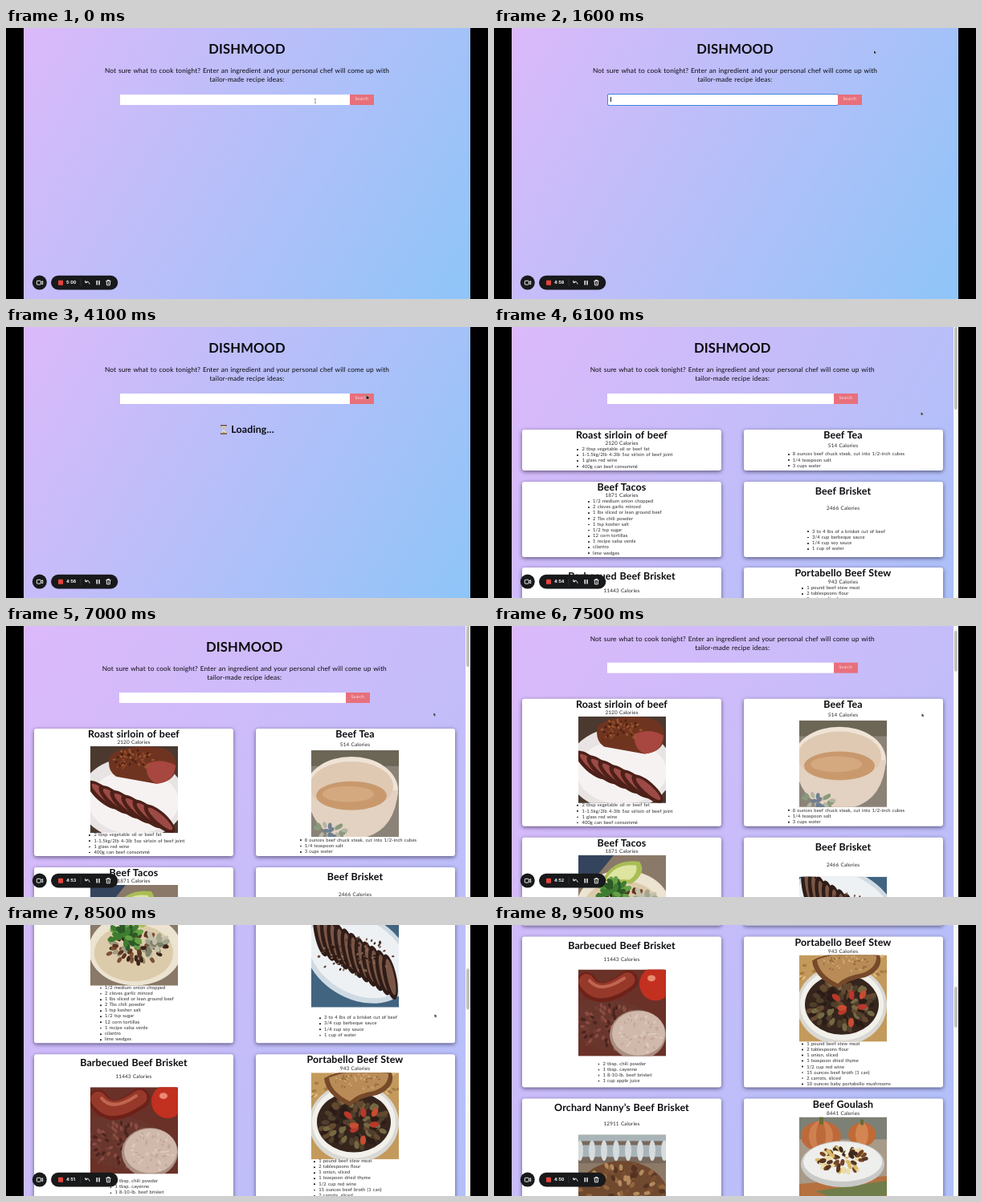
Animation of 600x338 px, one loop 9600 ms. Source, as an HTML page:

```html
<!DOCTYPE html>
<html lang="en">
<head>
<meta charset="utf-8">
<title>Recipe search</title>
<style>
@property --scroll { syntax: '<number>'; inherits: true; initial-value: 0; }

html, body { margin: 0; width: 100%; height: 100%; overflow: hidden; background: #000; }
* { box-sizing: border-box; }
h1, h2, p, ul { margin: 0; padding: 0; }

.stage {
  position: relative; width: 600px; height: 338px; overflow: hidden; background: #000;
  font: 8.3px/1.25 Lato, sans-serif; color: #0b0b10; text-rendering: geometricPrecision;
  letter-spacing: .015em; word-spacing: .06em;
  animation: scroll 9.6s linear infinite;
}
.window { position: absolute; left: 22px; width: 555.5px; height: 338px; overflow: hidden; background: #fafafa; }
.page {
  position: absolute; width: 556px; height: 338px;
  background: linear-gradient(120deg, #dcb9fa, #8ec5f8);
  transform: translateY(calc(var(--scroll) * -1px));
  animation: grow 9.6s step-end infinite;
}
.page > * { position: absolute; }
h1, .intro, .loading { left: 0; width: 100%; text-align: center; }
h1 { top: 15.5px; font-size: 16.6px; }
.intro { top: 48px; line-height: 10.5px; }

.search { left: 0; right: 0; top: 83px; margin: auto; width: 56.7%; height: 13px; display: flex; }
.field { flex: 1; background: #fff; padding: 2.5px 3px; font-size: 6.5px; line-height: 8px; }
.field.focus { outline: 1px solid #3e86dc; border-radius: 1px; }
.caret { display: inline-block; height: 6.5px; width: .6px; background: #222; vertical-align: -1px; }
.button { width: 29.7px; background: #e8707b; color: #fbdcdf; font-size: 5.4px; line-height: 13px; text-align: center; }

.loading { top: 120px; font-size: 12.45px; animation: wait 9.6s step-end infinite; opacity: 0; }
.loading svg { width: 10px; height: 12px; margin-right: 4px; vertical-align: -2px; }

.cards {
  left: 13px; top: 127.5px; width: 523.5px;
  display: grid; grid-template-columns: 1fr 1fr; gap: 13.8px 27.5px;
  opacity: 0; animation: show 9.6s step-end infinite;
}
.card {
  display: grid; align-items: center; justify-items: center;
  background: #fff; border-radius: 3px; box-shadow: 0 1.5px 5px rgba(20, 15, 40, .6);
}
.card h2 { font-size: 12.45px; line-height: 14.6px; }
.card p { font-size: 6.4px; line-height: 8px; color: #26262b; }
.card svg { display: block; width: 109px; height: 0; animation: load 9.6s step-end infinite; }
.card ul {
  position: relative; top: -1px; list-style: none; padding-left: 14px;
  font-size: 5.8px; line-height: 7.15px; color: #26262b;
}
.card li { position: relative; }
.card li::before {
  content: ''; position: absolute; left: -6px; top: 2.8px;
  width: 1.8px; height: 1.8px; border-radius: 50%; background: #111;
}

.thumb {
  position: absolute; left: 551px; top: 0; width: 4px; height: 103px; border-radius: 2px; background: #c1c1c1;
  transform: translateY(calc(var(--scroll) * .153px));
  opacity: 0; animation: show 9.6s step-end infinite, shrink 9.6s step-end infinite;
}
.recorder { position: absolute; left: 30px; top: 306px; width: 112px; height: 24px; }
.time { position: absolute; left: 75px; top: 314px; color: #fff; font: 700 5.4px/8px Inter, sans-serif; letter-spacing: 0; }
.cursor { position: absolute; left: 0; top: 0; width: 6px; height: 8px; overflow: visible; animation: point 9.6s ease-in-out infinite; }
.cursor path { display: none; }
.cursor.beam .beam, .cursor.arrow .arrow, .cursor.hand .hand { display: inline; }

@keyframes scroll {
  0%, 75% { --scroll: 0; }
  78.125% { --scroll: 37; }
  83.33% { --scroll: 195; }
  88.54% { --scroll: 355.5; }
  93.75% { --scroll: 476; }
  97.9%, 100% { --scroll: 502.5; }
}
@keyframes grow {
  62.5% { width: 549.5px; height: 1110px; }
  66.667%, 100% { width: 549.5px; height: 2200px; }
}
@keyframes wait { 41.667% { opacity: 1; } 62.5%, 100% { opacity: 0; } }
@keyframes show { 62.5%, 100% { opacity: 1; } }
@keyframes load { 66.667%, 100% { height: 108.3px; } }
@keyframes shrink { 66.667%, 100% { height: 51px; } }
@keyframes point {
  0%, 2% { transform: translate(385px, 91px); }
  6%, 9% { transform: translate(372px, 90px); }
  14.6%, 31.25% { transform: translate(473px, 28px); }
  38.5%, 50% { transform: translate(447.5px, 84px); }
  58.3%, 64% { transform: translate(531.5px, 106px); }
  78.125% { transform: translate(532.5px, 109px); }
  88.54%, 100% { transform: translate(533.5px, 111px); }
}
</style>
</head>
<body>
<div class="stage">
  <div class="window">
    <div class="page">
      <h1>DISHMOOD</h1>
      <p class="intro">Not sure what to cook tonight? Enter an ingredient and your personal chef will come up with<br>tailor-made recipe ideas:</p>
      <div class="search">
        <div class="field"><span class="typed"></span><span class="caret"></span></div>
        <div class="button">Search</div>
      </div>
      <h2 class="loading"><svg viewBox="0 0 10 12"><path d="M2 1H8V3.5L5.6 6 8 8.5V11H2V8.5L4.4 6 2 3.5Z" fill="#dfe6ea" stroke="#8d9aa3" stroke-width=".4"/><path d="M3 3H7L5 5.5ZM5 8L7.4 10.4H2.6Z" fill="#e0a53f"/><path d="M1 .3H9V1.6H1ZM1 10.4H9V11.7H1Z" fill="#5a3c2c"/></svg>Loading...</h2>
      <div class="cards"></div>
    </div>
    <div class="thumb"></div>
  </div>

  <svg class="recorder" viewBox="30 306 112 24">
    <g fill="#18191b">
      <circle cx="41.8" cy="317.6" r="9"/>
      <rect x="56" y="308.8" width="83.3" height="17.6" rx="8.8"/>
    </g>
    <rect x="65" y="314.8" width="6" height="6" rx=".6" fill="#e2463b"/>
    <path d="M93 313.5V322" stroke="#45464a" stroke-width=".6"/>
    <g fill="none" stroke="#fff" stroke-width=".9" stroke-linejoin="round">
      <rect x="38.3" y="315.3" width="5" height="4.8" rx=".8"/>
      <path d="M43.6 317L45.7 315.7V319.8L43.6 318.5"/>
      <path d="M98.8 315V317.6H101.2M99 317.4Q102.5 314.2 104.2 319.6"/>
      <path d="M113.2 315V320.5M116 315V320.5" stroke-width="1.4"/>
      <path d="M124.4 315.6H130.4M126.3 315.4V314.4H128.5V315.4M125.2 316L125.5 320.8H129.3L129.6 316M127.4 317.2V319.6"/>
    </g>
  </svg>
  <div class="time">5:00</div>

  <svg class="cursor" viewBox="0 0 6 8">
    <path class="beam" d="M-.8-2.8H.8M0-2.8V2.8M-.8 2.8H.8" stroke="#555" stroke-width=".6"/>
    <path class="arrow" d="M0 0V4.2L1 3.3 1.7 4.8 2.4 4.5 1.7 3.1H3Z" fill="#000" stroke="#fff" stroke-width=".3"/>
    <path class="hand" d="M1 .4Q1.6-.2 2 .5V2.2L4.2 2.9V4.6L3.6 6H1.6L0 3.8 1 3.7Z" fill="#000" stroke="#fff" stroke-width=".4"/>
  </svg>
</div>

<script>
const LOOP = 9600;
const $ = selector => document.querySelector(selector);

let seed = 7;
const random = () => (seed = seed * 16807 % 2147483647) / 2147483647;

const oval = (x, y, rx, ry, fill, turn = 0) =>
  `<ellipse cx="${x}" cy="${y}" rx="${rx}" ry="${ry}" fill="${fill}" transform="rotate(${turn} ${x} ${y})"/>`;
const shape = (d, fill) => `<path d="${d}" fill="${fill}"/>`;
const stroke = (d, color, width) =>
  `<path d="${d}" fill="none" stroke="${color}" stroke-width="${width}" stroke-linecap="round"/>`;
const fillAll = color => shape('M0 0H109V109H0Z', color);

// Small random ovals inside an elliptical area
const scatter = (count, x, y, rx, ry, size, colors) => Array.from({ length: count }, (_, i) => {
  const angle = random() * 2 * Math.PI, reach = Math.sqrt(random());
  return oval((x + rx * reach * Math.cos(angle)).toFixed(1), (y + ry * reach * Math.sin(angle)).toFixed(1),
    size, size * .6, colors[i % colors.length], Math.round(angle * 57));
}).join('');

// Evenly stepped slices of meat
const slices = (count, x, y, dx, dy, rx, ry, turn, dark, light) => Array.from({ length: count }, (_, i) =>
  oval(x + i * dx, y + i * dy, rx, ry, dark, turn) + oval(x + i * dx + 1, y + i * dy, rx * .55, ry * .8, light, turn)).join('');

const pictures = {
  roast: () => fillAll('#4b3930') + oval(52, 66, 66, 52, '#e9e4e4') + oval(54, 70, 56, 40, '#f6f2f2')
    + shape('M24 12Q45-4 88 2Q108 6 107 28Q104 45 82 47L32 38Q20 30 24 12Z', '#6f3420')
    + shape('M70 22Q88 14 106 24Q104 46 82 47Q68 40 70 22Z', '#a84640')
    + scatter(60, 52, 17, 27, 13, 2, ['#8c4524', '#4a2013', '#9c5a30'])
    + slices(6, 16, 61, 14, 6, 9, 25, -48, '#4d2018', '#9c4a46'),
  tea: () => fillAll('#8b8378') + shape('M0 0H109V20H0Z', '#6c6656') + oval(50, 50, 58, 42, '#efe3d5')
    + shape('M-6 50H108Q104 109 50 112Q0 109-6 50Z', '#e3d2c1') + oval(50, 45, 52, 31, '#dfc9b3')
    + oval(50, 57, 44, 18, '#c9996d') + oval(46, 55, 32, 10, '#d4a980')
    + scatter(20, 22, 101, 20, 9, 4, ['#8a9a7c', '#b3b4a4', '#6d7f92']),
  tacos: () => fillAll('#8a7968') + shape('M0 0H44L20 30H0Z', '#34445c') + oval(56, 64, 58, 45, '#ece3d0')
    + oval(54, 68, 49, 36, '#dccbab') + scatter(70, 56, 62, 38, 19, 4, ['#5b3522', '#7c5136', '#a09a80', '#3d241a'])
    + scatter(18, 80, 58, 18, 14, 5, ['#a3a58f', '#c4c0aa', '#7f8068'])
    + shape('M30 32Q42 4 76 8Q86 22 66 36Z', '#a9bd55') + shape('M35 30Q46 10 72 13Q75 23 64 31Z', '#dde5a0')
    + scatter(40, 44, 48, 20, 17, 5, ['#3f7d31', '#65a045', '#2c5a27']),
  brisket: () => fillAll('#416481') + oval(58, 46, 72, 52, '#cfdae3', 32) + oval(58, 45, 67, 46, '#eef1f4', 32)
    + slices(11, 12, 17, 8.6, 5.4, 8, 29, -12, '#2f1c17', '#795646')
    + scatter(70, 56, 45, 50, 24, 1.8, ['#8d6753', '#2c1812', '#583a2d']),
  sausage: () => fillAll('#6a3128') + oval(96, 18, 20, 21, '#c2301f') + oval(91, 11, 5, 4, '#eb8a72')
    + oval(42, 70, 58, 33, '#68362d', 12) + scatter(110, 42, 72, 50, 28, 3, ['#4b241e', '#8a4c41', '#743c33'])
    + stroke('M10 16Q24 42 62 14', '#6d2119', 25) + stroke('M10 15Q25 39 61 13', '#96392a', 19)
    + stroke('M14 14Q28 31 57 11', '#bf6650', 4)
    + oval(74, 82, 35, 31, '#a98e81') + oval(75, 80, 33, 28, '#d0b9ab')
    + scatter(60, 75, 81, 29, 25, 2, ['#c2a898', '#dccabd']),
  stew: () => fillAll('#c49a5c') + scatter(50, 54, 15, 62, 28, 3, ['#a87c42', '#d9b77d'])
    + oval(53, 63, 56, 50, '#d9d8d3') + oval(53, 62, 52, 45, '#f2f0ea') + oval(53, 62, 46, 38, '#35251d')
    + scatter(90, 53, 62, 41, 32, 5, ['#4f3f2b', '#63492f', '#2b1c17', '#756944'])
    + scatter(7, 66, 66, 28, 20, 6, ['#b8382b', '#c94c31'])
    + shape('M16 7Q40-8 100 0Q106 18 82 28Q60 31 48 42Q18 28 16 7Z', '#76492a')
    + shape('M22 6Q50-6 96 1Q97 16 78 23Q58 26 48 36Q24 24 22 6Z', '#b98c57')
    + scatter(45, 58, 11, 30, 10, 1.5, ['#96693d', '#d3ac78']),
  pot: () => fillAll('#8d7a68') + shape('M0 0H109V34H0Z', '#a9b4b8') + shape('M0 8H109V13H0ZM0 28H109V36H0Z', '#78685b')
    + Array.from({ length: 8 }, (_, i) => oval(i * 15 + 2, 20, 4, 13, '#d6dcdd')).join('')
    + oval(54, 78, 58, 45, '#70492f') + scatter(130, 54, 76, 55, 41, 4, ['#553321', '#94663f', '#b58a5e', '#7a5030']),
  goulash: () => fillAll('#7d8075') + shape('M0 28H109V109H0Z', '#a79a88')
    + oval(27, 24, 25, 19, '#bd6a3b') + oval(27, 24, 15, 19, '#cf8050') + oval(27, 24, 6, 19, '#bd6a3b')
    + oval(78, 22, 17, 15, '#c06a36') + oval(78, 22, 8, 15, '#d38552')
    + shape('M25 0H30V9H25ZM76 3H80V10H76Z', '#6b6a38')
    + shape('M0 84L109 74V109H0Z', '#b5703f') + shape('M20 93L109 80V98L60 109Z', '#6f7d4a')
    + oval(54, 59, 52, 29, '#c9c9c8') + oval(54, 56, 49, 25, '#eeeeec')
    + scatter(70, 55, 54, 32, 15, 4, ['#d9bb6a', '#583620', '#ecdca8', '#754526'])
    + scatter(14, 56, 46, 15, 7, 4, ['#f7f0dc', '#3e2a20']),
};

const recipes = [
  ['Roast sirloin of beef', 2120, 'roast', '2 tbsp vegetable oil or beef fat|1-1.5kg/2lb 4-3lb 5oz sirloin of beef joint|1 glass red wine|400g can beef consommé'],
  ['Beef Tea', 514, 'tea', '8 ounces beef chuck steak, cut into 1/2-inch cubes|1/4 teaspoon salt|3 cups water'],
  ['Beef Tacos', 1871, 'tacos', '1/2 medium onion chopped|2 cloves garlic minced|1 lbs sliced or lean ground beef|2 Tbs chili powder|1 tsp kosher salt|1/2 tsp sugar|12 corn tortillas|1 recipe salsa verde|cilantro|lime wedges'],
  ['Beef Brisket', 2466, 'brisket', '3 to 4 lbs of a brisket cut of beef|3/4 cup barbeque sauce|1/4 cup soy sauce|1 cup of water'],
  ['Barbecued Beef Brisket', 11443, 'sausage', '2 tbsp. chili powder|1 tbsp. cayenne|1 8-10-lb. beef brisket|1 cup apple juice'],
  ['Portabello Beef Stew', 943, 'stew', '1 pound beef stew meat|2 tablespoons flour|1 onion, sliced|1 teaspoon dried thyme|1/2 cup red wine|15 ounces beef broth (1 can)|2 carrots, sliced|10 ounces baby portabello mushrooms'],
  ['Orchard Nanny’s Beef Brisket', 12911, 'pot', '1 beef brisket|2 cans broth|1 cup soy sauce|5 cloves garlic'],
  ['Beef Goulash', 8441, 'goulash', '2 lbs beef|2 onions|1 tbsp paprika|1 cup broth|1 tsp salt|2 carrots|1 bay leaf|noodles|sour cream']
];

$('.cards').innerHTML = recipes.map(([title, calories, picture, items]) => `
  <div class="card">
    <h2>${title}</h2>
    <p>${calories} Calories</p>
    <svg viewBox="0 0 109 109" preserveAspectRatio="none">${pictures[picture]()}</svg>
    <ul>${items.split('|').map(item => `<li>${item}</li>`).join('')}</ul>
  </div>`).join('');

const cursor = $('.cursor'), field = $('.field'), typed = $('.typed'), caret = $('.caret'), clock = $('.time');

function draw() {
  const t = performance.now() % LOOP;
  const seconds = 300 - Math.floor((t + 700) / 1000);
  clock.textContent = `${Math.floor(seconds / 60)}:${String(seconds % 60).padStart(2, '0')}`;

  const focused = t >= 600 && t < 3900;
  field.classList.toggle('focus', focused);
  typed.textContent = focused ? 'beef'.slice(0, Math.max(0, Math.floor((t - 1900) / 200))) : '';
  caret.style.opacity = focused && (t - 600) % 1000 < 500 ? 1 : 0;

  const kind = t < 1000 ? 'beam' : t > 3500 && t < 5000 ? 'hand' : t < 9000 ? 'arrow' : '';
  cursor.setAttribute('class', `cursor ${kind}`);
  requestAnimationFrame(draw);
}
draw();
</script>
</body>
</html>
```
